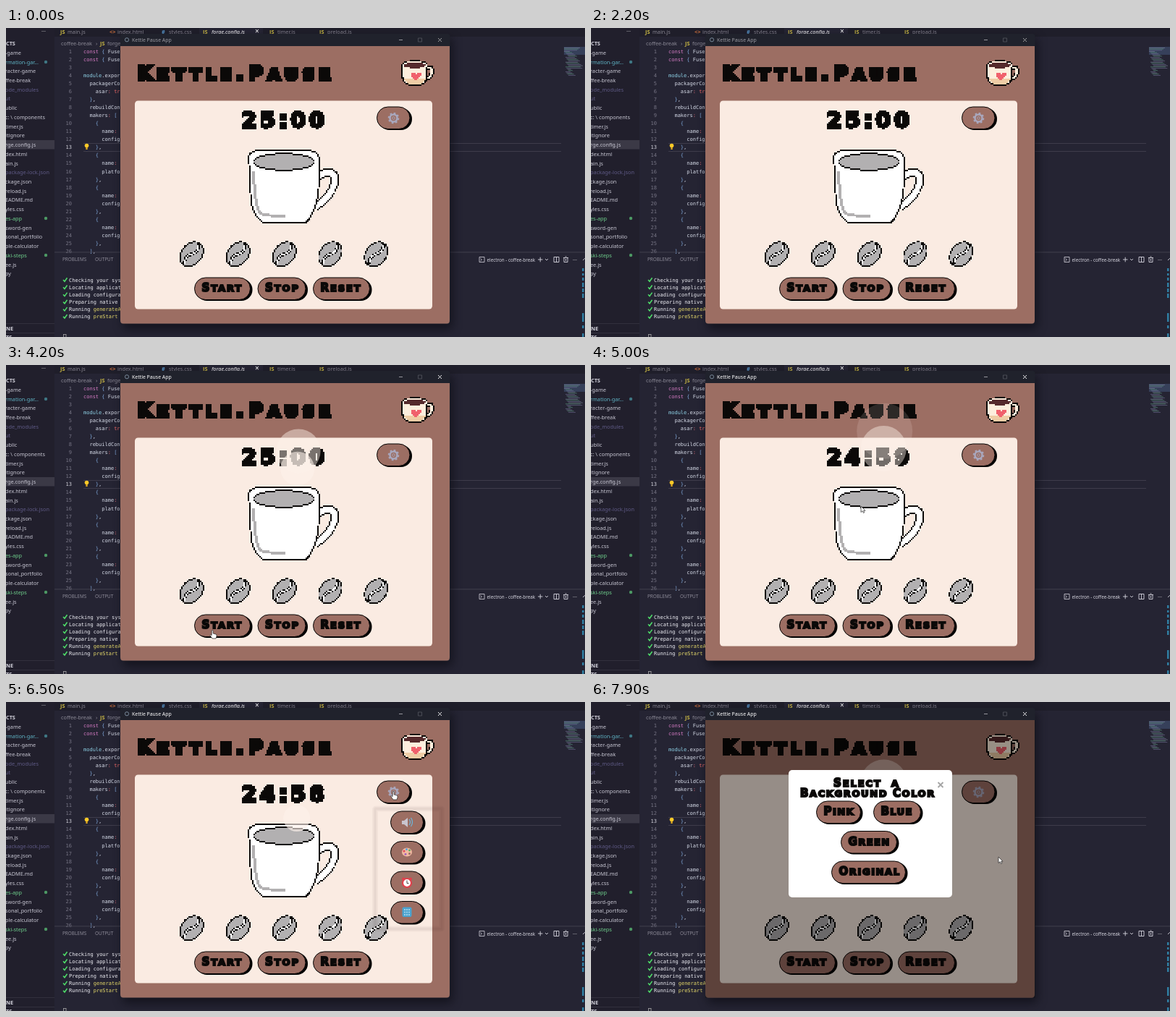
An HTML page that plays this animation: 800x427 px, repeating every 8000 ms.

```html
<!DOCTYPE html>
<html lang="en">
<head>
<meta charset="utf-8">
<title>Timer app</title>
<style>
html, body { margin: 0; width: 100%; height: 100%; overflow: hidden; background: #252433; }
svg { display: block; width: 100vw; height: 100vh; }
text { white-space: pre; }
.ui { font-family: "Noto Sans", "Open Sans", sans-serif; font-size: 7.3px; }
.code { font-family: "DejaVu Sans Mono", monospace; font-size: 7px; }
.chunky { font-family: "DejaVu Sans", sans-serif; font-weight: bold; fill: #0b0908; stroke: #0b0908; }
.art { shape-rendering: crispEdges; }
.shadow { filter: blur(7px); }
</style>
</head>
<body>
<svg id="stage" viewBox="0 0 800 427"></svg>
<script>
const BROWN = '#9c6e63', CREAM = '#faebe2', GREY = '#b2b0b1', INK = '#0b0908';
const START = 3900, MENU = 6400, MODAL = 7600, LOOP = 8000;

const rect = (x, y, w, h, fill, more = '') =>
  `<rect x="${x}" y="${y}" width="${w}" height="${h}" fill="${fill}" ${more}/>`;
const path = (d, fill, stroke = 'none', width = 1, more = '') =>
  `<path d="${d}" fill="${fill}" stroke="${stroke}" stroke-width="${width}" ${more}/>`;
const dot = (x, y, r, fill, more = '') =>
  `<circle cx="${x}" cy="${y}" r="${r}" fill="${fill}" ${more}/>`;
const text = (s, x, y, fill, cls = 'ui', more = '') =>
  `<text x="${x}" y="${y}" fill="${fill}" class="${cls}" ${more}>${s}</text>`;
const group = (body, more) => `<g ${more}>${body}</g>`;

// Lower-case letters become smaller capitals.
function chunky(s, x, y, big, small, spacing, stroke, more = '') {
  const caps = s.replace(/[a-z]+/g, m => `<tspan font-size="${small}">${m.toUpperCase()}</tspan>`);
  return `<text class="chunky" x="${x}" y="${y}" font-size="${big}" letter-spacing="${spacing}" stroke-width="${stroke}" ${more}>${caps}</text>`;
}

const label = (s, x, y, spacing, more) => chunky(s, x, y, 15, 13, spacing, 2.1, more);

function pill(x, y, w, name = '', spacing = 1.9) {
  return rect(x + 2.5, y + 1.5, w, 30.5, '#000', 'rx="15.2"') +
    rect(x + .5, y, w - 1, 30.5, BROWN, 'rx="15.2" stroke="#000"') +
    (name && label(name, x + 10.5, y + 19.3, spacing));
}

const mosaic = `<defs><filter id="mosaic" filterUnits="userSpaceOnUse" x="0" y="0" width="800" height="427" color-interpolation-filters="sRGB">
  <feFlood x="0" y="0" width="1" height="1"/>
  <feComposite x="0" y="0" width="2" height="2"/>
  <feTile result="grid"/>
  <feComposite in="SourceGraphic" in2="grid" operator="in" result="a"/>
  <feOffset dx="1" result="b"/>
  <feMerge result="c"><feMergeNode in="a"/><feMergeNode in="b"/></feMerge>
  <feOffset dy="1" result="d"/>
  <feMerge><feMergeNode in="c"/><feMergeNode in="d"/></feMerge>
  <feComponentTransfer><feFuncA type="discrete" tableValues="0 1"/></feComponentTransfer>
</filter></defs>`;

function sidebar() {
  const teal = '#5fb3c4', dim = '#5f5a86', plain = '#c9c8d4', green = '#6fd08c';
  const items = ['-game', ['rmation-gar...', teal], 'racter-game', 'ffee-break', ['ode_modules', dim],
    ['ut', dim], 'ublic', 'c: \\ components', 'timer.js', 'itignore', 'rge.config.js', 'dex.html',
    'ain.js', ['package-lock.json', dim], 'ckage.json', 'reload.js', 'EADME.md', 'yles.css',
    ['es-app', green], 'sword-gen', 'sonal_portfolio', 'ple-calculator', ['ski-steps', green], 'ee.js', 'py'];
  let out = rect(0, 0, 67, 427, '#211f2c') + rect(0, 155, 67, 12.5, '#3b3946') +
    text('CTS', 0, 23.5, '#d5d4de', 'ui', 'font-weight="bold"') + text('···', 49, 7, '#ddd');
  items.forEach((item, i) => {
    const [name, fill] = Array.isArray(item) ? item : [item, plain];
    out += text(name, -1, 36.8 + i * 12.73, fill);
  });
  out += dot(55, 47, 2.2, '#3f7784') + dot(55, 263, 2.2, '#4d9964') + dot(55, 314, 2.2, '#4d9964');
  out += rect(0, 408, 67, .7, '#3a3846') + rect(0, 421, 67, .7, '#3a3846');
  return out + text('NE', 0, 417.5, '#d5d4de', 'ui', 'font-weight="bold"') +
    text('TS', 0, 429.5, '#d5d4de', 'ui', 'font-weight="bold"');
}

function editor() {
  const tabs = [['JS', 75, 'main.js', 85], ['&lt;&gt;', 143, 'index.html', 154], ['#', 215, 'styles.css', 225],
    ['JS', 272, 'forge.config.js', 284], ['JS', 364, 'timer.js', 375], ['JS', 433, 'preload.js', 444]];
  let out = rect(67, 0, 733, 12, '#1f1e2a') + rect(267, 0, 88, 12, '#252433');
  tabs.forEach(([icon, ix, name, x], i) => {
    const tint = icon === 'JS' ? '#c9b845' : icon === '#' ? '#5a9ad0' : '#d0703c';
    out += text(icon, ix, 7.5, tint, 'ui', 'font-weight="bold"') +
      text(name, x, 7.8, i === 3 ? '#fff' : '#85838f', 'ui', i === 3 ? 'font-style="italic"' : '');
  });
  out += text('×', 344, 8, '#fff', 'ui', 'style="font-size:10px"');
  out += text('coffee-break', 76, 24, '#8d8b98') + text('›', 124, 24, '#8d8b98') +
    text('JS', 130, 24, '#c9b845', 'ui', 'font-weight="bold"') + text('forge.config.js', 140, 24, '#8d8b98');

  const lines = ['const { Fuse', 'const { Fuse', '', 'module.expor', '  packagerCo', '    asar: tr', '  },',
    '  rebuildCon', '  makers: [', '    {', '      name:', '      config', '    },', '    {', '      name:',
    '      platfo', '    },', '    {', '      name:', '      config', '    },', '    {', '      name:',
    '      config', '    },', '  ],'];
  const tints = { const: '#d57bc4', tr: '#f06a6a', module: '#8fd3e8', ':': '#e06c75' };
  const paint = s => s.replace(/const|[{}\[\]]|:|\btr\b|module/g, m =>
    `<tspan fill="${tints[m] || '#7fa6d8'}">${m}</tspan>`);
  out += rect(107, 159, 660, .8, '#454352') + rect(107, 170, 660, .8, '#454352');
  lines.forEach((s, i) => {
    const y = 35.2 + i * 11.02;
    out += text(i + 1, 91, y, i === 12 ? '#d5d4de' : '#777585', 'code', 'text-anchor="end"') +
      text(paint(s), 107, y, '#d6dbe8', 'code');
  });
  out += dot(111.5, 162.5, 2.8, '#ffca28') + rect(110.3, 165, 2.4, 3, '#d9a520');

  // Minimap
  out += rect(771, 26, 29, 11, '#36405a');
  for (let i = 0; i < 24; i++) {
    const x = 771 + (i > 3 ? 2 + i % 4 * 1.3 : 0), w = i < 3 ? 22 - i * 2 : 5 + i * 37 % 18;
    out += rect(x, 27 + i * 1.65, w, .8, ['#8791a8', '#62a187', '#77759c'][i % 3], 'opacity=".7"');
  }
  return out;
}

function terminal() {
  let out = rect(67, 309.5, 733, .8, '#484654') +
    text('PROBLEMS', 78, 322.3, '#8d8b98', 'ui', 'style="font-size:6.4px"') +
    text('OUTPUT', 123, 322.3, '#8d8b98', 'ui', 'style="font-size:6.4px"');
  out += path('M654 316.5h7v7h-7z M655.5 318.5l2 1.7l-2 1.7', 'none', '#d5d4de', .8) +
    text('electron - coffee-break', 664.5, 322.5, '#d5d4de', 'ui', 'style="font-size:6.3px"') +
    path('M735 320h6.5 M738.2 316.7v6.6 M745 319l2 2l2-2', 'none', '#d5d4de', .9) +
    path('M757 316.5h7v7h-7z M760.5 316.5v7 M770 317.5h7 M771 317.5v6h5v-6 M772.5 316h2 M773.5 319v3', 'none', '#d5d4de', .9) +
    text('···', 783, 322.5, '#ddd') + path('M797 321l2.5-2.5l2.5 2.5', 'none', '#d5d4de', .9);
  ['Checking your sys', 'Locating applicat', 'Loading configura', 'Preparing native',
    'Running <tspan fill="#e5d96a">generateA</tspan>', 'Running <tspan fill="#e5d96a">preStart</tspan>']
    .forEach((s, i) => {
      const y = 350.5 + i * 10.15;
      out += path(`M79 ${y - 2.5}l2 2.3l3.5-5`, 'none', '#4fe06a', 1.5) + text(s, 87, y, '#f0f0f6', 'code');
    });
  out += rect(79.5, 423.5, 3.5, 6, 'none', 'stroke="#aaa" stroke-width=".8"');
  for (const [y, h] of [[332, 4], [339, 3], [345, 4], [352, 6], [360, 5], [367, 6], [394, 12], [411, 4], [422, 5]])
    out += rect(796, y, 2.5, h, '#2f7fa3');
  return out;
}

function bean(x) {
  return group(`<ellipse rx="18.5" ry="14" fill="${GREY}" stroke="${INK}" stroke-width="1.7"/>` +
    path('M-17 1Q-8 -6 0 0T17 -1', 'none', INK, 4) + path('M-16 1Q-8 -6 0 0T16 -1', 'none', '#fff', 1.8),
    `transform="translate(${x} 312) rotate(-50)"`);
}

function mug() {
  const handle = 'M430 205Q441 197 449 200Q457 204 453 215Q447 235 427 246';
  return path(handle, 'none', INK, 11.5) + path(handle, 'none', '#fff', 8) +
    path('M335 179Q335 169 350 169H418Q432 170 432 181V215Q430 252 414 268.500H356Q342 262 338 238Z', '#fff', INK, 1.9) +
    `<ellipse id="drink" cx="383.5" cy="184.5" rx="42" ry="11.5" stroke="${INK}" stroke-width="1.9"/>` +
    path('M342 197Q342 238 350 255Q354 259 385 259.5', 'none', GREY, 4);
}

function badge() {
  const handle = 'M580 54h6q5 7-2 14l-5 2';
  return path(handle, 'none', INK, 6) + path(handle, 'none', '#fdeedd', 3) +
    path('M547 50V67Q550 77 556 78H573Q580 76 581 67V50Z', '#fdeedd', INK, 2) +
    path('M549 70Q552 76 558 77H572Q578 74 579 70Z', '#efcda6') +
    '<ellipse cx="564" cy="51" rx="16" ry="5" fill="#552a2c" stroke="#fdeedd" stroke-width="2"/>' +
    path('M547 50Q548 45 564 45Q580 45 581 50', 'none', INK, 1.6) +
    path('M566 72l-7-6v-3l2-2h3l2 2l2-2h3l2 2v3z', '#f0606c');
}

function gear(x, y) {
  return dot(x, y, 5, 'none', 'stroke="#a9a7bd" stroke-width="2.6"') +
    dot(x, y, 6.8, 'none', 'stroke="#a9a7bd" stroke-width="2" stroke-dasharray="2.6 2.74"') +
    dot(x, y, 1.8, 'none', 'stroke="#a9a7bd" stroke-width="1"');
}

function appWindow() {
  let out = rect(161, 14, 456, 402, '#08080f', 'rx="5" opacity=".6" class="shadow"') +
    rect(158, 8, 455.5, 401, '#20222c', 'rx="4"') +
    path('M158 25H613V404Q613 408.500 609 408.500H162Q158 408.500 158 404Z', BROWN) +
    dot(167, 16.3, 2.6, 'none', 'stroke="#8fa3b5" stroke-width=".8"') +
    text('Kettle Pause App', 174, 18.8, '#9b9ba3', 'ui', 'id="caption" style="font-size:6.9px"') +
    path('M543 16.500h5', 'none', '#b5b5bb', .8) + path('M569.500 14h5v5h-5z', 'none', '#55565f', .8) +
    path('M597 14l5 5m0-5l-5 5', 'none', '#aaa', .9, 'id="close"') +
    rect(178, 100.5, 411, 288, CREAM, 'rx="4.5"');
  out += group(chunky('Kettle.Pause', 181, 72.2, 28, 23.5, 5.9, 4.6) +
    chunky('25:00', 325, 136.5, 30, 30, 4.7, 3.6, 'id="clock"') +
    [256, 320, 384, 447.5, 511].map(bean).join('') + mug() + badge(), 'class="art" filter="url(#mosaic)"');
  return out + pill(260, 345, 78, 'Start') + pill(347.5, 345, 67, 'Stop') + pill(424, 345, 79, 'Reset') +
    pill(512, 109, 46.5) + gear(535.5, 124.5);
}

function menu() {
  let out = [2, 5, 8].map(w =>
    rect(510, 147.5, 92, 166, 'none', `rx="1" stroke="#402020" stroke-opacity=".035" stroke-width="${w}"`)).join('');
  for (const y of [151, 192.5, 234, 275.5]) out += pill(531, y, 46);
  out += path('M547 164h3l5-4v13l-5-4h-3z', '#c9c5cf') + path('M557 162q3 4 0 8m2.500-10q4 6 0 12', 'none', '#6cb7dc', 1.2);
  out += '<ellipse cx="554" cy="207.500" rx="7" ry="6" fill="#f0b9a0"/>' +
    dot(550, 206, 1.5, '#e2495b') + dot(553.5, 203.7, 1.4, '#4a9de0') + dot(557.5, 205, 1.4, '#55b35c') +
    dot(552, 210.3, 1.4, '#9b59c0') + dot(557.5, 209.5, 1.5, BROWN);
  out += dot(554, 250, 6, '#fff', 'stroke="#e0404c" stroke-width="2.2"') + dot(549, 244.5, 2, '#e0404c') + dot(559, 244.5, 2, '#e0404c') +
    path('M554 246.500v4h2.500', 'none', '#333', .9);
  return out + rect(547.5, 283.5, 13, 13.5, '#4aa3cf', 'rx="2"') +
    path('M551 286v9m3-9v9m3-9v9', 'none', '#d5effa', 1.2, 'stroke-dasharray="2 1.500"');
}

function modal() {
  return rect(158, 25, 455.5, 383.5, '#000', 'opacity=".4"') + rect(273, 94, 226, 176, '#fff', 'rx="5"') +
    label('Select a', 335, 116.7, 1.9, 'word-spacing="6"') +
    label('Background Color', 289, 130.5, 1.6) +
    path('M479.500 111l7 7m0-7l-7 7', 'none', '#a5a5a5', 1.9) +
    pill(311, 137, 62, 'Pink', 1.4) + pill(390, 137, 66, 'Blue', 1.4) +
    pill(345, 178.5, 78, 'Green', 1.4) + pill(332, 220, 103, 'Original', 1.6);
}

const arrow = path('M0 0V8.500L2 6.700L3.500 9.500L4.800 8.800L3.500 6.200H6Z', '#fff', '#222', .7);
const hand = path('M-.8 0Q.2 -1 1.200 0V4L5 5Q6.500 5.500 6 8L5 11H0L-3.200 6.500Q-3.300 5 -.8 6.500Z', '#fff', '#222', .7);

const stage = document.getElementById('stage');
stage.innerHTML = mosaic + editor() + terminal() + sidebar() + appWindow() +
  group('', 'id="steam"') + group(menu(), 'id="menu"') + group(modal(), 'id="modal"') +
  group(group(arrow, 'id="arrow"') + group(hand, 'id="hand"'), 'id="cursor"');

const $ = id => document.getElementById(id);
const show = (id, on) => $(id).setAttribute('visibility', on ? 'visible' : 'hidden');

// time, x, y
const route = [[2300, 300, 430], [2900, 285, 367], [4300, 285, 367], [5000, 373, 195], [5800, 490, 118],
  [6200, 535, 124], [6600, 535, 124], [7100, 549, 183], [7300, 553, 205], [7600, 553, 205], [7900, 563, 214]];
// Start times of the steam puffs; the first two are already under way when steam appears.
const puffs = [2150, 2850, 5650, 6750], PUFF = 3000;

function along(t) {
  const i = Math.max(1, route.findIndex(p => p[0] >= t));
  const [t0, x0, y0] = route[i - 1], [t1, x1, y1] = route[i];
  const k = Math.max(0, (t - t0) / (t1 - t0)), e = k * k * (3 - 2 * k);
  return [x0 + (x1 - x0) * e, y0 + (y1 - y0) * e];
}

function puff(p) {
  if (p < 0 || p > 1) return '';
  return dot(400 + 6 * p, 190 - 104 * p, 10 + 30 * p, '#fdf1ea', `opacity="${.06 + .58 * (1 - p ** 3)}"`);
}

function draw(t) {
  const active = t >= START;
  const left = 1500 - Math.max(0, Math.floor((t - START) / 1000));
  $('clock').textContent = Math.floor(left / 60) + ':' + String(left % 60).padStart(2, '0');
  $('caption').setAttribute('fill', active ? '#fff' : '#9b9ba3');
  $('close').setAttribute('stroke', active ? '#fff' : '#aaa');
  $('drink').setAttribute('fill', active && (t - START) % 2000 >= 1500 ? '#4b1d1c' : GREY);
  $('steam').innerHTML = active ? puffs.map(start => puff((t - start) / PUFF)).join('') : '';

  show('menu', t >= MENU && t < MODAL);
  show('modal', t >= MODAL);
  const seen = t >= 2300, pointing = t >= 2800 && t < 4500 || t >= 6100 && t < 7700;
  show('arrow', seen && !pointing);
  show('hand', seen && pointing);
  $('cursor').setAttribute('transform', `translate(${along(Math.min(t, 7900))})`);
}

function tick() {
  const t = performance.now() % LOOP;
  draw(t - t % 100);
  requestAnimationFrame(tick);
}
tick();
</script>
</body>
</html>
```
